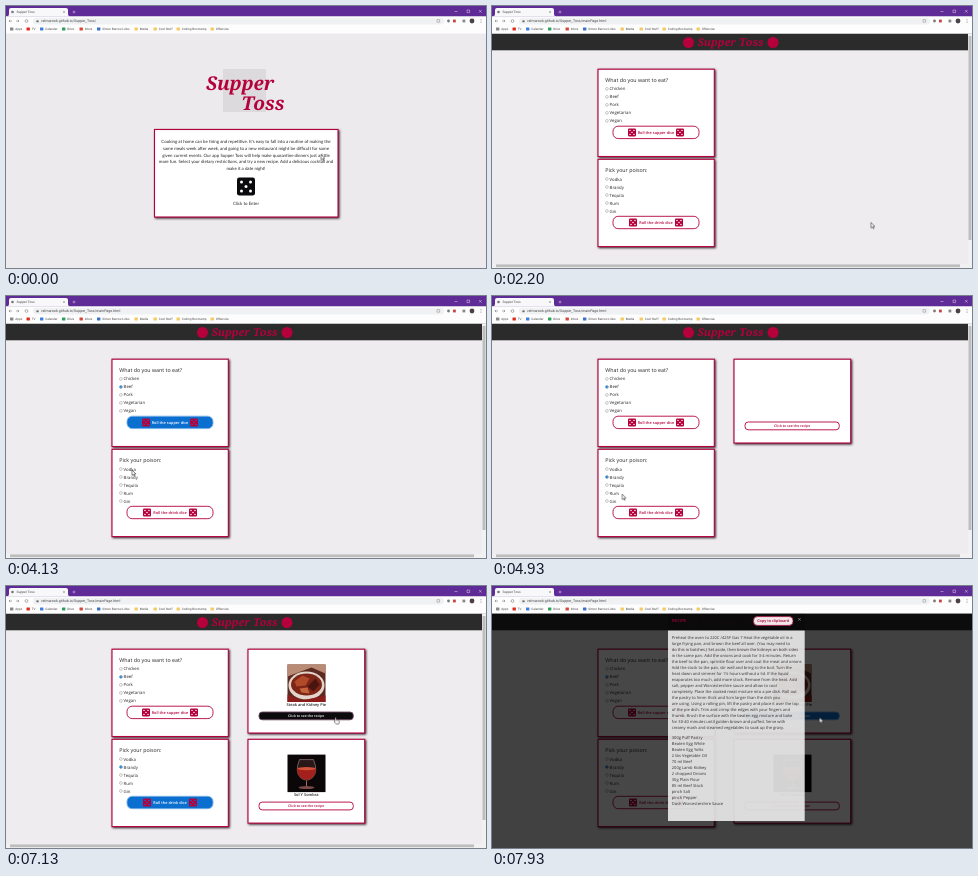
Animation of 480x262 px, one loop 8 s. Source, as an HTML page:

```html
<!DOCTYPE html>
<html lang="en">
<head>
<meta charset="utf-8">
<title>Supper Toss</title>
<style>
html, body { margin: 0; width: 100%; height: 100%; overflow: hidden; background: #eeecef; }
svg { display: block; width: 100vw; height: 100vh; }
text { text-rendering: geometricPrecision; white-space: pre; }
.ui { font-family: Roboto, sans-serif; }
.intro { font-family: Lato, sans-serif; }
.page { font-family: "Open Sans", sans-serif; }
.brand { font-family: "Noto Serif", serif; font-weight: 700; font-style: italic; }
.card { filter: drop-shadow(1.3px 1.3px .9px rgba(20, 0, 10, .85)); }
</style>
</head>
<body>
<svg id="stage" viewBox="0 0 480 262"></svg>
<script>
const NS = 'http://www.w3.org/2000/svg';
const LOOP = 8000;
const RED = '#b5003c', INK = '#252525', BLUE = '#0b6fd0', BLACK = '#0b0b0d', WHITE = '#ffffff';
const stage = document.getElementById('stage');

function add(parent, tag, attrs = {}, body) {
  const el = document.createElementNS(NS, tag);
  for (const k in attrs) el.setAttribute(k, attrs[k]);
  if (body !== undefined) el.textContent = body;
  parent.appendChild(el);
  return el;
}
const group = (p, attrs) => add(p, 'g', attrs);
const rect = (p, x, y, width, height, fill, more) => add(p, 'rect', { x, y, width, height, fill, ...more });
const circle = (p, cx, cy, r, fill, more) => add(p, 'circle', { cx, cy, r, fill, ...more });
const path = (p, d, fill, more) => add(p, 'path', { d, fill, ...more });
const line = (p, d, stroke, w = .6) => path(p, d, 'none', { stroke, 'stroke-width': w });
const text = (p, x, y, size, str, cls, fill = INK, more) =>
  add(p, 'text', { x, y, 'font-size': size, class: cls, fill, ...more }, str);
const MID = { 'text-anchor': 'middle' };

// Steps are [ms, value]; a repeated time makes a hard change.
function track(el, prop, steps) {
  const all = [...steps];
  if (all[0][0] > 0) all.unshift([0, all[0][1]]);
  if (all[all.length - 1][0] < LOOP) all.push([LOOP, all[all.length - 1][1]]);
  el.animate(all.map(([t, v]) => ({ offset: t / LOOP, [prop]: v })),
    { duration: LOOP, iterations: Infinity });
}
const show = (el, at) => track(el, 'opacity', [[at, 0], [at, 1]]);
const hide = (el, at) => track(el, 'opacity', [[at, 1], [at, 0]]);

function card(p, x, y, w, h) {
  rect(p, x, y, w, h, WHITE, { stroke: RED, 'stroke-width': 1.1, class: 'card' });
}

function die(p, x, y, s, fill, pip, r) {
  rect(p, x, y, s, s, fill, { rx: s * .13 });
  const pips = group(p, { fill: pip });
  for (const [u, v] of [[.25, .25], [.75, .25], [.5, .5], [.25, .75], [.75, .75]])
    add(pips, 'circle', { cx: x + u * s, cy: y + v * s, r });
  return pips;
}

// Pill button; states are [ms, 'rest' | 'hover' | 'focus'].
const LOOK = {
  rest: { bg: WHITE, fg: RED, rim: RED },
  hover: { bg: BLACK, fg: WHITE, rim: '#6d4a62' },
  focus: { bg: BLUE, fg: WHITE, rim: '#79b2e8' }
};
function button(p, x, y, w, h, label, size, states, dice) {
  const box = rect(p, x, y, w, h, WHITE, { rx: h * .42, stroke: RED, 'stroke-width': .9 });
  const cap = text(p, x + w / 2, y + h / 2 + size * .36, size, label, 'page', RED,
    { ...MID, 'font-weight': 600 });
  const pips = dice ? dice.map(dx => die(p, dx, y + h / 2 - 4, 8, RED, WHITE, .72)) : [];
  const fade = key => {
    let look = LOOK.rest;
    const steps = [[0, look[key]]];
    for (const [t, name] of states) {
      steps.push([t, look[key]]);
      look = LOOK[name];
      steps.push([t + 110, look[key]]);
    }
    return steps;
  };
  track(box, 'fill', fade('bg'));
  track(box, 'stroke', fade('rim'));
  track(cap, 'fill', fade('fg'));
  pips.forEach(g => track(g, 'fill', fade('bg')));
}

// Landing page
rect(stage, 0, 27, 480, 235, '#eceaed');
const landing = group(stage);
rect(landing, 217, 63, 43, 43, '#dcdadc');
text(landing, 234, 84, 19, 'Supper', 'brand', RED, MID);
text(landing, 257, 104, 19, 'Toss', 'brand', RED, MID);
card(landing, 148.5, 123.5, 183.5, 87.5);
[
  "Cooking at home can be tiring and repetitive. It's easy to fall into a routine of making the",
  'same meals week after week, and going to a new restaurant might be difficult for some',
  'given current events. Our app Supper Toss will help make quarantine dinners just a little',
  'more fun. Select your dietary restrictions, and try a new recipe. Add a delicious cocktail and',
  'make it a date night!'
].forEach((s, i) => text(landing, 240, 137.1 + i * 6.75, 4.4, s, 'intro', INK, MID));
die(landing, 231, 171.5, 18, BLACK, WHITE, 1.5);
text(landing, 240, 199.3, 4.4, 'Click to Enter', 'intro', INK, MID);

// Main page
const main = group(stage);
rect(main, 0, 27, 480, 235, '#eeecef');
rect(main, 0, 27.5, 480, 16.8, '#2b2b2b');
const logo = group(main);
circle(logo, 196.5, 36.5, 5.5, RED);
circle(logo, 281, 36.5, 5.5, RED);
text(logo, 238.5, 40.2, 10.8, 'Supper Toss', 'brand', RED, MID);
track(logo, 'transform', [[7600, 'translateX(0px)'], [7600, 'translateX(2.5px)']]);

function choices(y, title, names, picked, at, states, label, dice) {
  card(main, 106, y, 116.3, 87.3);
  text(main, 113.3, y + 12.3, 5.3, title, 'page');
  names.forEach((s, i) => {
    const cy = y + 19.7 + i * 8;
    circle(main, 114.9, cy, 1.4, WHITE, { stroke: '#777', 'stroke-width': .4 });
    if (i === picked) {
      const mark = group(main);
      circle(mark, 114.9, cy, 1.3, WHITE, { stroke: BLUE, 'stroke-width': .5 });
      circle(mark, 114.9, cy, .9, BLUE);
      show(mark, at);
    }
    text(main, 117.6, cy + 1.5, 4.3, s, 'page');
  });
  button(main, 121, y + 57, 86, 12.4, label, 3.85, states, dice);
}
choices(63.2, 'What do you want to eat?', ['Chicken', 'Beef', 'Pork', 'Vegetarian', 'Vegan'], 1, 3270,
  [[3440, 'hover'], [3800, 'focus'], [4480, 'rest']], 'Roll the supper dice', [136, 184]);
choices(153.3, 'Pick your poison:', ['Vodka', 'Brandy', 'Tequila', 'Rum', 'Gin'], 1, 4480,
  [[5070, 'hover'], [5750, 'focus'], [7540, 'rest']], 'Roll the drink dice', [137, 183]);

function result(y, name, at, loaded, states, paint) {
  const g = group(main);
  card(g, 242, y, 116.7, 83.8);
  button(g, 253, y + 62.8, 94.3, 7.8, 'Click to see the recipe', 3.45, states);
  show(g, at);
  const pic = group(g);
  paint(group(pic, { transform: `translate(281.5 ${y + 15.3})` }));
  text(pic, 300.3, y + 57.1, 3.95, name, 'page', INK, { ...MID, 'font-weight': 600 });
  show(pic, loaded);
}
result(63.2, 'Steak and Kidney Pie', 4400, 5070, [[6300, 'hover'], [7540, 'focus']], g => {
  rect(g, 0, 0, 38, 37.5, '#5a2a20');
  path(g, 'M0 0H38V9L24 3L0 12Z', '#b98b74');
  add(g, 'ellipse', { cx: 19, cy: 21, rx: 18, ry: 14, fill: '#e3d5cb' });
  add(g, 'ellipse', { cx: 19, cy: 20, rx: 15.5, ry: 11, fill: '#7d2617' });
  path(g, 'M7 17L15 11L22 14L18 21L9 22Z', '#b04a2b');
  path(g, 'M20 22L28 14L32 20L26 27Z', '#4a1510');
  path(g, 'M12 24L20 23L22 29L14 28Z', '#c4643c');
  path(g, 'M0 30L14 36L38 31V37.5H0Z', '#8b1d1a');
});
result(153.3, 'Sol Y Sombra', 6870, 6930, [], g => {
  rect(g, 0, 0, 38, 37.5, '#0b0708');
  path(g, 'M12 5H26Q31 17 25 23Q19 28 13 23Q7 17 12 5Z', '#2a1718', { stroke: '#a8908c', 'stroke-width': .6 });
  path(g, 'M9.6 14H28.4Q29 19 25 23Q19 28 13 23Q9 19 9.6 14Z', '#a3211c');
  add(g, 'ellipse', { cx: 19, cy: 14, rx: 9.3, ry: 1.6, fill: '#d4523a' });
  line(g, 'M19 26V32', '#b4605a', 1);
  add(g, 'ellipse', { cx: 19, cy: 33, rx: 8, ry: 1.5, fill: '#7b4a48' });
});

const bars = group(main);
rect(bars, 476, 27.5, 4, 230.5, '#f1f1f1');
rect(bars, 476.5, 30, 3, 204, '#bdbdbd');
rect(bars, 0, 257.6, 480, 4.4, '#f1f1f1');
rect(bars, 4, 258.4, 464, 2.8, '#bdbdbd');
hide(bars, 7600);
show(main, 1330);

// Recipe dialog
const veil = rect(stage, 0, 27, 480, 235, '#000');
track(veil, 'opacity', [[7530, 0], [7670, .46], [7930, .72]]);

const dialog = group(stage);
rect(dialog, 176, 27.5, 137, 17, '#0c0b0c');
rect(dialog, 176, 44.5, 136.7, 190.5, '#f2f2f2', { opacity: .92 });
text(dialog, 180, 35.7, 4.3, 'RECIPE', 'page', '#a00835', { 'font-weight': 600 });
rect(dialog, 261.5, 30.6, 39.5, 8.8, '#fff4f6', { rx: 4, stroke: RED, 'stroke-width': .7 });
text(dialog, 281.2, 36.4, 3.8, 'Copy to clipboard', 'page', RED, { ...MID, 'font-weight': 600 });
line(dialog, 'M306.2 32.2l2.4 2.4m0-2.4l-2.4 2.4', '#ccc', .5);
[
  'Preheat the oven to 220C /425F Gas 7 Heat the vegetable oil in a',
  'large frying pan, and brown the beef all over. (You may need to',
  'do this in batches.) Set aside, then brown the kidneys on both sides',
  'in the same pan. Add the onions and cook for 3-4 minutes. Return',
  'the beef to the pan, sprinkle flour over and coat the meat and onions',
  'Add the stock to the pan, stir well and bring to the boil. Turn the',
  'heat down and simmer for 1½ hours without a lid. If the liquid',
  'evaporates too much, add more stock. Remove from the heat. Add',
  'salt, pepper and Worcestershire sauce and allow to cool',
  'completely. Place the cooked meat mixture into a pie dish. Roll out',
  'the pastry to 5mm thick and 5cm larger than the dish you',
  'are using. Using a rolling pin, lift the pastry and place it over the top',
  'of the pie dish. Trim and crimp the edges with your fingers and',
  'thumb. Brush the surface with the beaten egg mixture and bake',
  'for 30-40 minutes until golden brown and puffed. Serve with',
  'creamy mash and steamed vegetables to soak up the gravy.'
].forEach((s, i) => text(dialog, 179.8, 52.6 + i * 6.05, 4.05, s, 'page', '#303030'));
[
  '300g Puff Pastry', 'Beaten Egg White', 'Beaten Egg Yolks', '2 tbs Vegetable Oil', '70 ml Beef',
  '200g Lamb Kidney', '2 chopped Onions', '30g Plain Flour', '85 ml Beef Stock', 'pinch Salt',
  'pinch Pepper', 'Dash Worcestershire Sauce'
].forEach((s, i) => text(dialog, 179.8, 152.9 + i * 6, 4.05, s, 'page', '#303030'));
track(dialog, 'opacity', [[7680, 0], [7800, .5], [7930, .95]]);
track(dialog, 'transform', [[7680, 'translateY(-12px)'], [7800, 'translateY(-3px)'], [7920, 'translateY(0px)']]);

// Browser window
const win = group(stage);
rect(win, 0, 0, 480, 10.5, '#5f2b96');
path(win, 'M1 10.5Q3 10 3 8V4Q3 2 5 2H60Q62 2 62 4V8Q62 10 64 10.5Z', '#f8f7fa');
circle(win, 6.5, 6, 1.3, '#777');
text(win, 10.5, 7.2, 3.3, 'Supper Toss', 'ui', '#444');
line(win, 'M57 5l2 2m0-2l-2 2', '#666', .4);
line(win, 'M66.5 6h3m-1.5-1.5v3', '#fff', .4);
line(win, 'M448.5 5.5h3M461 4h2.6v2.6h-2.6zM473 4l2.6 2.6m0-2.6l-2.6 2.6', '#fff', .4);
rect(win, 0, 10.5, 480, 17, '#fdfdfe');
line(win, 'M6 15H3m1.2-1.2L3 15l1.2 1.2M10 15h3m-1.2-1.2L13 15l-1.2 1.2', '#666', .5);
circle(win, 20.5, 15, 1.4, 'none', { stroke: '#666', 'stroke-width': .5 });
rect(win, 27, 11.7, 411, 6.8, '#f0f1f3', { rx: 3.4 });
rect(win, 30.4, 14.4, 2.2, 1.8, '#666');
const site = 'velmarook.github.io/Supper_Toss/';
hide(text(win, 35, 16.2, 3.6, site, 'ui', '#444'), 1330);
show(text(win, 35, 16.2, 3.6, site + 'mainPage.html', 'ui', '#444'), 1330);
line(win, 'M431 13.6h2.6v2.6h-2.6z', '#888', .5);
circle(win, 442.5, 15, 1.4, '#777');
rect(win, 447, 13.6, 2.8, 2.8, '#c9443c');
rect(win, 456.5, 13.6, 2.8, 2.8, '#888');
circle(win, 466, 15, 2.4, '#4a4148');
for (const y of [13.5, 15, 16.5]) circle(win, 475, y, .4, '#555');

const FOLDER = '#f3cb62';
[
  [4, '#888', 'Apps'], [20.5, '#e02a20', 'TV'], [34, '#3f7de0', 'Calendar'], [56, '#2ea05a', 'Drive'],
  [73.5, '#d8463a', 'Inbox'], [91, '#3a70c8', 'Simon Barrow Links'], [128.5, FOLDER, 'Media'],
  [147.5, FOLDER, 'Cool Stuff'], [170.5, FOLDER, 'Coding Bootcamp'], [204.5, FOLDER, 'Offensive']
].forEach(([x, fill, name]) => {
  rect(win, x, 21.4, 3.4, 3, fill, { rx: .4 });
  text(win, x + 5.2, 24.1, 3.1, name, 'ui', '#444');
});

// Mouse pointer
const mouse = group(stage);
const arrow = path(mouse, 'M0 0V5.4L1.3 4.3L2.2 6.2L3 5.8L2.2 4H3.9Z', '#fff', { stroke: '#111', 'stroke-width': .5 });
const hand = path(mouse, 'M0 .3Q.7-.3 1.2.4V2.6L4 3.2Q4.6 3.5 4.4 4.6L3.8 6.4H.9L-1 3.9Q-.8 3.2 0 3.7Z',
  '#fff', { stroke: '#111', 'stroke-width': .5 });
const overLink = [[960, 1330], [3440, 3800], [5070, 5700], [6330, 7600]];
const blink = (a, b) => [[0, a], ...overLink.flatMap(([s, e]) => [[s, a], [s, b], [e, b], [e, a]])];
track(hand, 'opacity', blink(0, 1));
track(arrow, 'opacity', blink(1, 0));
track(mouse, 'transform', [
  [0, 315, 148.5], [330, 315, 148.5], [580, 388, 148], [780, 335, 160], [1060, 242, 181], [1300, 242, 181],
  [1650, 330, 203], [1950, 379, 216.5], [2230, 379, 216.5], [2520, 240, 135], [2870, 125, 89],
  [3130, 121, 90], [3290, 121, 90], [3500, 180, 126], [3750, 180, 126], [4070, 126, 174], [4150, 126, 174],
  [4400, 120, 181], [4560, 120, 181], [4930, 130, 198], [5150, 165, 215], [5520, 192, 216],
  [5730, 211, 198.5], [5870, 226, 190], [6150, 295, 149], [6470, 332, 131.5], [6670, 332, 131.5],
  [6730, 329, 131.5], [7550, 329, 131.5], [7650, 327.5, 131.5]
].map(([t, x, y]) => [t, `translate(${x}px, ${y}px)`]));
</script>
</body>
</html>
```
